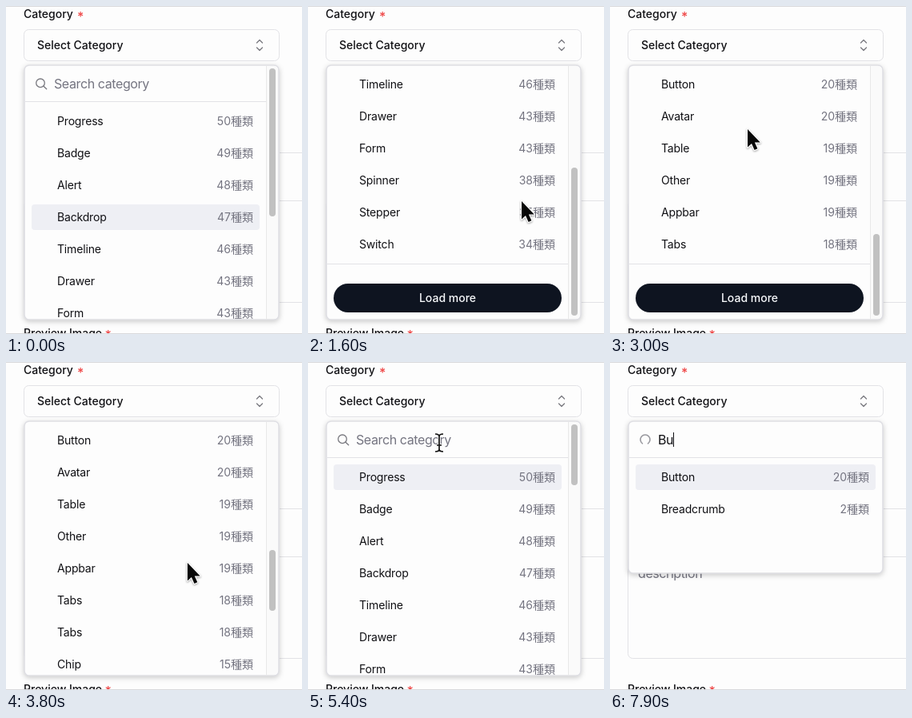
These frames come from a looping animation (370x410 px, 8000 ms). An HTML page:

```html
<!DOCTYPE html>
<html lang="en">
<head>
<meta charset="utf-8">
<title>Category select</title>
<style>
html, body { margin: 0; width: 100%; height: 100%; overflow: hidden; background: #fdfdfd; }
svg { display: block; width: 370px; height: 410px; font: 14px Inter, "Noto Sans CJK JP", "Noto Sans CJK", sans-serif; }
.med { font-weight: 500; }
.ink { fill: #101014; }
.mute { fill: #747480; }
.name { letter-spacing: -.012em; }
.big { font-size: 16px; letter-spacing: -.025em; }
.star { font-size: 16px; fill: #ef4444; font-weight: 500; }
.line { stroke: #e2e2e6; fill: none; }
.icon { fill: none; stroke: #78787f; stroke-width: 1.3; stroke-linecap: round; stroke-linejoin: round; }
#panel { filter: drop-shadow(0 2px 3px rgba(0, 0, 0, .2)); }
</style>
</head>
<body>
<svg viewBox="0 0 370 410">
  <defs><clipPath id="clip"><rect id="clipBox" x="24" y="75" width="316" height="316" rx="5"/></clipPath></defs>
  <rect width="370" height="410" fill="#fdfdfd"/>
  <text class="med ink" x="22" y="15">Category</text>
  <text class="star" x="89" y="19">*</text>
  <path class="line" d="M342 183.5H370"/>
  <rect class="line" x="22.5" y="243.5" width="400" height="127" rx="6"/>
  <text class="mute big" x="35" y="270">description</text>
  <text class="med ink" x="22" y="414">Preview Image</text>
  <text class="star" x="123.5" y="417">*</text>
  <path d="M0 .5H370M0 409.5H370" stroke="#d9d9dc"/>
  <rect class="line" x="22.5" y="29.5" width="319" height="39" rx="6" style="fill:#fdfdfd"/>
  <text class="med ink" x="39" y="54">Select Category</text>
  <path class="icon" d="M313.5 46l3.5-3.5 3.5 3.5M313.5 52l3.5 3.5 3.5-3.5"/>
  <rect id="panel" x="23" y="74" width="318" height="318" rx="6" fill="#fdfdfd" stroke="#dfdfe4" stroke-width="1.6"/>
  <g id="content" clip-path="url(#clip)"></g>
  <g id="pointer"></g>
</svg>
<script>
const LOOP = 8000, STEP = 100, VIEW = 316, TOP = 75;
const $ = id => document.getElementById(id);

const items = ('Progress 50,Badge 49,Alert 48,Backdrop 47,Timeline 46,Drawer 43,Form 43,Spinner 38,' +
  'Stepper 35,Switch 34,Card 31,Pagination 30,Dialog 24,Skeleton 22,Button 20,Avatar 20,Table 19,' +
  'Other 19,Appbar 19,Tabs 18,Tabs 18,Chip 15,Carousel 12,Snackbar 12,Accordion 12,Menu 10,' +
  'Tooltip 8,Rating 5,Breadcrumb 2').split(',').map(s => s.split(' '));
const named = list => list.split(' ').map(n => items.find(i => i[0] === n));

const scrollKeys = [[300, 0], [1100, 206], [2700, 206], [3000, 606], [4000, 606], [4300, 747], [4500, 897], [4800, 897], [5300, 0]];
const cursorKeys = [
  [100, 268, 262], [200, 266, 258], [400, 266, 258], [1300, 267, 244], [1600, 267, 244],
  [1900, 240, 360], [2100, 235, 367], [2400, 235, 367], [2600, 172, 154], [3000, 172, 154],
  [3400, 215, 362], [3600, 215, 362], [3900, 231, 212], [4900, 231, 212], [5400, 164, 101],
  [5700, 164, 101], [5900, 164, 100], [6400, 164, 100], [6600, 164, 99]
];

// Eased value(s) between neighbouring keys
function track(keys, t) {
  const i = keys.findIndex(k => k[0] > t);
  if (i < 0) return keys[keys.length - 1].slice(1);
  if (i === 0) return keys[0].slice(1);
  const a = keys[i - 1], b = keys[i];
  const p = (t - a[0]) / (b[0] - a[0]), e = p * p * (3 - 2 * p);
  return a.slice(1).map((v, j) => v + (b[j + 1] - v) * e);
}

function row([name, count], y, right, active) {
  const bg = active ? `<rect x="32" y="${y - 16}" width="${right - 8 - 16}" height="32" rx="4" fill="#eeeff4"/>` : '';
  return `${bg}<text class="ink name" x="64" y="${y + 5}">${name}</text>` +
    `<text class="mute" x="${right}" y="${y + 5}" text-anchor="end">${count}種類</text>`;
}

function search(query, caret, t, right) {
  const icon = t >= 7600
    ? `<path class="icon" style="stroke:#98989e;stroke-width:1.6" d="M40.5 101.9A6 6 0 1 1 47.5 101.9" transform="rotate(${(t - 7900) * .36} 44 97)"/>`
    : '<path class="icon" d="M48.3 96.3a5.3 5.3 0 1 1-10.6 0a5.3 5.3 0 1 1 10.6 0M47 100.3l3.7 3.5"/>';
  const text = query
    ? `<text class="ink big" x="60" y="103">${query}</text>`
    : '<text class="mute big" x="60" y="103">Search category</text>';
  const x = [60, 70, 79][query.length];
  const bar = caret ? `<rect x="${x}" y="88" width="1" height="18" fill="#101014"/>` : '';
  return `${icon}${text}${bar}<path class="line" d="M24 119.5H${right}"/>`;
}

function scrollbar(scroll, height) {
  const len = Math.floor(VIEW * VIEW / height - 6);
  const y = Math.floor(TOP + 3 + scroll / height * VIEW);
  return `<rect x="325" y="75" width="16" height="316" fill="#fafafa"/><path d="M325.5 75V391" stroke="#e8e8e8"/>` +
    `<rect x="329" y="${y}" width="8" height="${len}" rx="4" fill="#c1c1c1"/>`;
}

const beam = 'M-5 -11Q0 -11 0 -8Q0 -11 5 -11M0 -8V8M-5 11Q0 11 0 8Q0 11 5 11M-3 3H3';
const beamShape = `<path d="${beam}" fill="none" stroke="#fff" stroke-width="3.5"/>` +
  `<path d="${beam}" fill="none" stroke="#111" stroke-width="1.7"/>`;
const arrowShape = '<path d="M0 0V22.5L5 18L8.6 26L12.4 24.3L8.9 16.6H15.8Z" fill="#080808" stroke="#fff" ' +
  'stroke-width="2.4" paint-order="stroke" stroke-linejoin="round" style="filter:drop-shadow(0 1px 1px rgba(0,0,0,.35))"/>';

function pointer(t) {
  if (t < 100 || t >= 7600) return '';
  const [x, y] = track(cursorKeys, t);
  return `<g transform="translate(${x} ${y})">${t >= 5300 ? beamShape : arrowShape}</g>`;
}

function render(t) {
  const query = t < 7600 ? '' : t < 7800 ? 'B' : 'Bu';
  const short = query === 'Bu';
  const size = t < 2100 ? 10 : t < 3600 ? 20 : 29;
  const more = size < 29;
  const list = short ? named('Button Breadcrumb')
    : query ? named('Badge Backdrop Button Breadcrumb Table Appbar Tabs Snackbar')
    : items.slice(0, size);
  const height = 53 + list.length * 40 + (more ? 69 : 0);
  const scroll = track(scrollKeys, t)[0];
  const active = t < 2100 ? 3 : t >= 3900 && t < 5200 ? 17 : 0;
  const caret = t >= 5600 && Math.floor((t - 5600) / 500) % 2 === 0;
  const right = short ? 340 : 325;

  let html = search(query, caret, t, right);
  list.forEach((item, i) => {
    const y = 144 + i * 40;
    if (y - scroll > 40 && y - scroll < 420) html += row(item, y, right - 16, i === active);
  });
  if (more) {
    const end = 128 + size * 40;
    html += `<path class="line" d="M24 ${end + .5}H325"/>` +
      `<rect x="32" y="${end + 25}" width="285" height="36" rx="18" fill="#0e1420"/>` +
      `<text class="med" x="174.5" y="${end + 48}" fill="#f8fafc" text-anchor="middle">Load more</text>`;
  }
  $('panel').setAttribute('height', short ? 190 : 318);
  $('clipBox').setAttribute('height', short ? 188 : VIEW);
  $('content').innerHTML = `<g transform="translate(0 ${-Math.round(scroll)})">${html}</g>` +
    (short ? '' : scrollbar(scroll, height));
  $('pointer').innerHTML = pointer(t);
}

const start = performance.now();
let last = -1;
function tick() {
  const t = Math.floor((performance.now() - start) % LOOP / STEP) * STEP;
  if (t !== last) render(last = t);
  requestAnimationFrame(tick);
}
tick();
</script>
</body>
</html>
```
